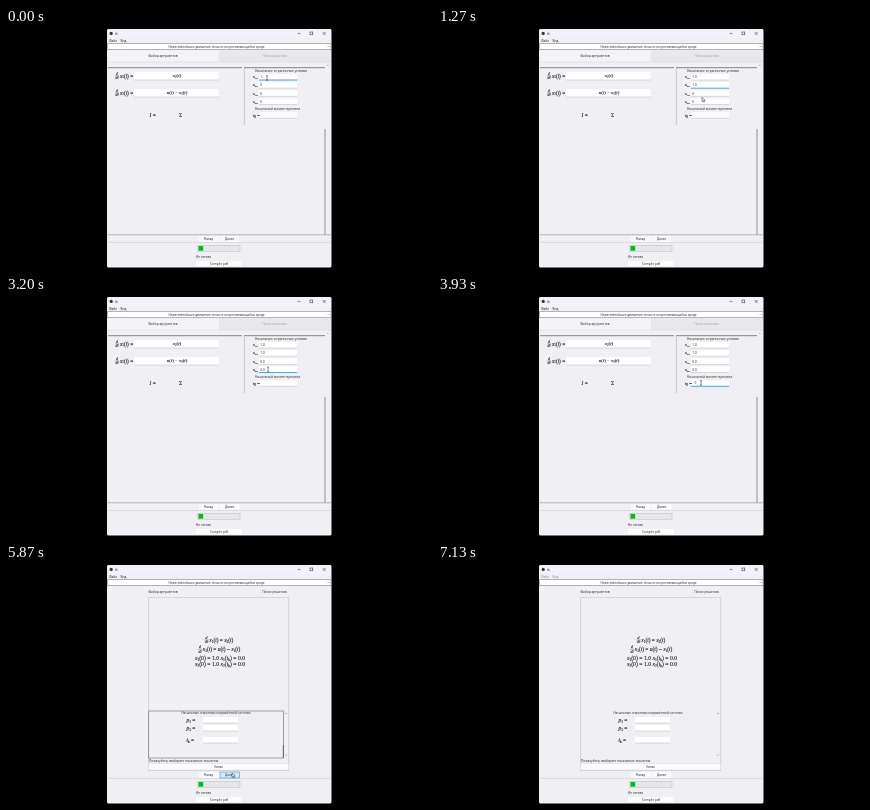
Write an HTML page that moves like this. It is 426 px wide and 240 px high and loops after 7.19 s.

```html
<!DOCTYPE html>
<html lang="ru">
<head>
<meta charset="utf-8">
<title>Нелинейное движение</title>
<style>
  html, body { margin: 0; width: 100%; height: 100%; overflow: hidden; background: #000; }
  svg { display: block; width: 100vw; height: 100vh; }
  text { font: 3.2px "Open Sans", "Noto Sans", sans-serif; fill: #222; white-space: pre; }
  .math { font-family: "Liberation Serif", "Noto Serif", serif; stroke: #222; stroke-width: .12; }
</style>
</head>
<body>
<svg id="stage" viewBox="0 0 426 240" xmlns="http://www.w3.org/2000/svg"></svg>
<script>
const LOOP = 7190, STEP = 1000 / 15;
const PAGE_SWITCH = 5060, BLUR = 6690;
const FACE = "#f0f0f4", INK = "#222", GREY = "#a0a0a6", BLUE = "#4a9ad8";

const rect = (x, y, w, h, fill, extra = "") =>
  `<rect x="${x}" y="${y}" width="${w}" height="${h}" fill="${fill}" ${extra}/>`;
const line = (x1, y1, x2, y2, color = GREY, width = .6, extra = "") =>
  `<path d="M${x1} ${y1}L${x2} ${y2}" stroke="${color}" stroke-width="${width}" ${extra}/>`;
const label = (x, y, s, anchor = "middle", extra = "") =>
  `<text x="${x}" y="${y + 1.15}" text-anchor="${anchor}" ${extra}>${s}</text>`;
const entry = (x, y, w, h) =>
  rect(x, y, w, h, "#fff") + line(x, y + h, x + w, y + h, "#b4b4ba", .5);

// Markup: letters are italic, "_c" makes a subscript.
function math(x, y, s, size = 5.2, anchor = "start") {
  const body = s.replace(/_(.)|([a-zA-Z])/g, (m, sub, letter) => sub
    ? `<tspan dy=".9" font-size="${size * .62}">${sub}</tspan><tspan dy="-.9">\u200b</tspan>`
    : `<tspan font-style="italic">${letter}</tspan>`);
  return `<text class="math" x="${x}" y="${y + size * .3}" text-anchor="${anchor}" style="font-size:${size}px">${body}</text>`;
}
const derivative = (x, y) =>
  math(x, y - 2, "d", 3.8, "middle") + line(x - 2, y, x + 2, y, INK, .4) +
  math(x, y + 2.3, "dt", 3.8, "middle");
const chevron = (x, y, dir) =>
  `<path d="M${x - 1} ${y + dir * .5}L${x} ${y - dir * .5}L${x + 1} ${y + dir * .5}" fill="none" stroke="#777" stroke-width=".5"/>`;

const fields = [
  { y: 46, name: "x_1_0", keys: [[0, "1."], [200, "1.0"]], focus: 0 },
  { y: 54.2, name: "x_2_0", keys: [[0, "0"], [800, "1"], [930, "1."], [1060, "1.0"]], focus: 670 },
  { y: 62.4, name: "x_1_k", keys: [[0, "0"], [2130, "0."], [2260, "0.0"]], focus: 1600 },
  { y: 70.5, name: "x_2_k", keys: [[0, "0"], [2930, "0."], [3070, "0.0"]], focus: 2660 },
  { y: 84.3, name: "t_0 =", keys: [[0, ""], [3870, "0"], [4070, "0."], [4200, "0.0"]], focus: 3530 }
];
const FIELD_X = 253, FIELD_W = 38, FIELD_H = 6;

const cursorPath = [
  [0, 261, 50], [500, 261, 50], [760, 262, 58], [1030, 262, 58], [1270, 264, 69.2],
  [1600, 263, 66], [2400, 264, 67], [2660, 262, 73.5], [3200, 262, 73.5], [3530, 263, 87],
  [4200, 263, 87], [4700, 226, 208], [5870, 226, 209], [6350, 226, 209], [6680, 333, 224], [LOOP, 333, 224]
];

function chrome() {
  return rect(101, 1, 224.5, 238.5, FACE, 'rx="1.5"') +
    rect(101.5, 1.3, 223.5, 9, "#f3f2fc", 'rx="1.3"') +
    '<circle cx="105.2" cy="5.4" r="1.6" fill="#333"/>' +
    label(109, 5.4, "tk", "start") +
    line(291.5, 5.4, 294.5, 5.4, INK, .5) +
    rect(304, 4, 2.8, 2.8, "none", `stroke="${INK}" stroke-width=".5"`) +
    `<path d="M316.7 4l3 3m0-3l-3 3" stroke="${INK}" stroke-width=".5"/>` +
    `<g id="menu">${label(103, 12.8, "Файл", "start")}${label(114.5, 12.8, "Вид", "start")}</g>` +
    rect(101.5, 15.7, 223.5, 5.6, "#fff", 'stroke="#85858c" stroke-width=".6"') +
    label(210.5, 18.5, "Нелинейнейшее движение точки в сопротивляющейся среде") +
    chevron(322.6, 18.6, -1);
}

function footer() {
  return line(101.5, 214.5, 325, 214.5, "#c2c2c8", .5) +
    rect(193, 208, 20, 6, "#fafafc") + label(202.5, 211, "Назад") +
    rect(214, 208, 19.5, 6, "#fafafc", 'id="next" stroke-width=".6"') + label(223.7, 211, "Далее") +
    rect(191.8, 217.3, 42.2, 6, "#e7e7ea", 'stroke="#bbb" stroke-width=".5"') +
    rect(192.5, 218, 4.6, 4.7, "#08b52a") +
    label(197.5, 229, "Не готово") +
    rect(190, 233, 45.5, 5.2, "#fcfcfd") + label(213, 235.6, "Сompile pdf");
}

function inputPage() {
  const rows = fields.map((f, i) =>
    entry(FIELD_X, f.y, FIELD_W, FIELD_H) +
    math(247, f.y + 3, f.name, i < 4 ? 4.2 : 5) +
    `<text class="value" x="${i < 4 ? 254.3 : 256.5}" y="${f.y + 4.1}"></text>`).join("");
  return rect(101.5, 22.5, 111.5, 11.5, "#f4f4f8") + rect(213, 22.5, 112, 11.5, "#e8e8ec") +
    line(101.5, 34, 325, 34, "#d0d0d6", .5) +
    label(157, 28, "Выбор аргументов") +
    label(268.5, 28, "Поиск решения", "middle", 'style="fill:#9b9ba1"') +
    line(102, 39.7, 236, 39.7, "#55555c", .7) + line(238, 39.7, 319, 39.7, "#55555c", .7) +
    line(238.3, 40, 238.3, 97, "#a9a9b0", .6) + chevron(321.5, 37.3, 1) +
    derivative(111, 48) + math(114, 48, "x_1(t) =") +
    entry(128, 44, 84.5, 8) + math(171, 48, "x_2(t)", 4.9, "middle") +
    derivative(111, 65) + math(114, 65, "x_2(t) =") +
    entry(128, 61, 84.5, 8) + math(171, 65, "u(t) − x_2(t)", 4.9, "middle") +
    math(143.5, 87, "I =", 5.4) + math(174.5, 87, "Σ", 5.4, "middle") +
    label(249, 42.4, "Начальные и граничные условия", "start") +
    label(249, 80.8, "Начальный момент времени", "start") + rows +
    line(0, 0, FIELD_W, 0, BLUE, .8, 'id="focus"') +
    line(319, 101, 319, 206.5, "#77777e", .8) +
    line(101.5, 206.8, 325, 206.8, "#85858c", .6);
}

function resultPage() {
  const costates = [["p_1 =", 156], ["p_2 =", 164], ["t_k =", 176]];
  return label(157, 28, "Выбор аргументов") + label(268.5, 28, "Поиск решения") +
    rect(142.3, 33.7, 140.5, 173, "none", 'stroke="#c2c2c8" stroke-width=".6"') +
    derivative(200.5, 76) + math(203.3, 76, "x_1(t) = x_2(t)", 5.4) +
    derivative(194, 85.2) + math(196.8, 85.2, "x_2(t) = u(t) − x_2(t)", 5.4) +
    math(214, 94, "x_1(0) = 1.0 x_1(t_k) = 0.0", 5.7, "middle") +
    math(214, 100.6, "x_2(0) = 1.0 x_2(t_k) = 0.0", 5.7, "middle") +
    `<g id="frame">${rect(142.7, 147, 134.8, 47, "none", 'stroke="#77777e" stroke-width=".7"')}` +
    `${line(277.3, 181, 277.3, 194, "#55555c", .8)}</g>` +
    label(210, 149.3, "Начальные значения сопряжённой системы") +
    costates.map(([s, y]) => math(180.5, y, s, 5.4) + entry(197, y - 3, 35, 6)).join("") +
    chevron(280, 149.4, 1) + chevron(280, 191.2, -1) +
    label(143, 196.9, "Пожалуйста, выберите начальные значения", "start") +
    rect(142.3, 199.7, 140.5, 6.3, "#fcfcfd", 'stroke="#d0d0d6" stroke-width=".4"') +
    label(212.5, 202.9, "Запас");
}

const stage = document.getElementById("stage");
stage.innerHTML =
  `<clipPath id="window">${rect(101, 1, 224.5, 238.5, "#fff")}</clipPath>` +
  rect(0, 0, 426, 240, "#000") + chrome() +
  `<g id="input">${inputPage()}</g><g id="result">${resultPage()}</g>` + footer() +
  `<g clip-path="url(#window)"><g id="cursor">` +
  `<path id="arrow" d="M0 0V4.4L1 3.5L1.8 5L2.5 4.7L1.8 3.2H3.1Z" fill="#fff" stroke="#111" stroke-width=".45"/>` +
  `<path id="beam" d="M-1-2.2H1M0-2.2V2.2M-1 2.2H1" fill="none" stroke="#222" stroke-width=".5"/></g></g>`;

const $ = id => document.getElementById(id);
const values = [...document.querySelectorAll(".value")];
const show = (id, on) => $(id).setAttribute("display", on ? "inline" : "none");
const latest = (list, time, at) => list.filter(item => at(item) <= time).pop();

function cursorAt(time) {
  const i = Math.max(1, cursorPath.findIndex(k => k[0] > time));
  const [t0, x0, y0] = cursorPath[i - 1], [t1, x1, y1] = cursorPath[i];
  const u = (time - t0) / (t1 - t0), e = u * u * (3 - 2 * u);
  return [x0 + (x1 - x0) * e, y0 + (y1 - y0) * e];
}

function render(time) {
  const solved = time >= PAGE_SWITCH, active = time < BLUR;
  show("input", !solved);
  show("result", solved);
  show("frame", active);
  $("menu").setAttribute("opacity", active ? 1 : .5);

  fields.forEach((f, i) => values[i].textContent = latest(f.keys, time, k => k[0])[1]);
  const focused = latest(fields, time, f => f.focus);
  $("focus").setAttribute("transform", `translate(${FIELD_X} ${focused.y + FIELD_H})`);
  $("focus").setAttribute("stroke", time < 4500 ? BLUE : "#55555c");

  const [x, y] = cursorAt(time);
  const typing = !solved && x > FIELD_X && fields.some(f => y >= f.y && y <= f.y + FIELD_H);
  const hover = x > 214 && x < 234 && y > 207.5 && y < 214;
  show("beam", typing);
  show("arrow", !typing);
  $("cursor").setAttribute("transform", `translate(${x} ${y})`);
  $("next").setAttribute("fill", hover && solved ? "#d5e8f8" : "#fafafc");
  $("next").setAttribute("stroke", hover && solved ? BLUE : "none");
}

const start = performance.now();
function tick() {
  const time = (performance.now() - start) % LOOP;
  render(Math.floor((time + 4) / STEP) * STEP);
  requestAnimationFrame(tick);
}
render(0);
requestAnimationFrame(tick);
</script>
</body>
</html>
```
